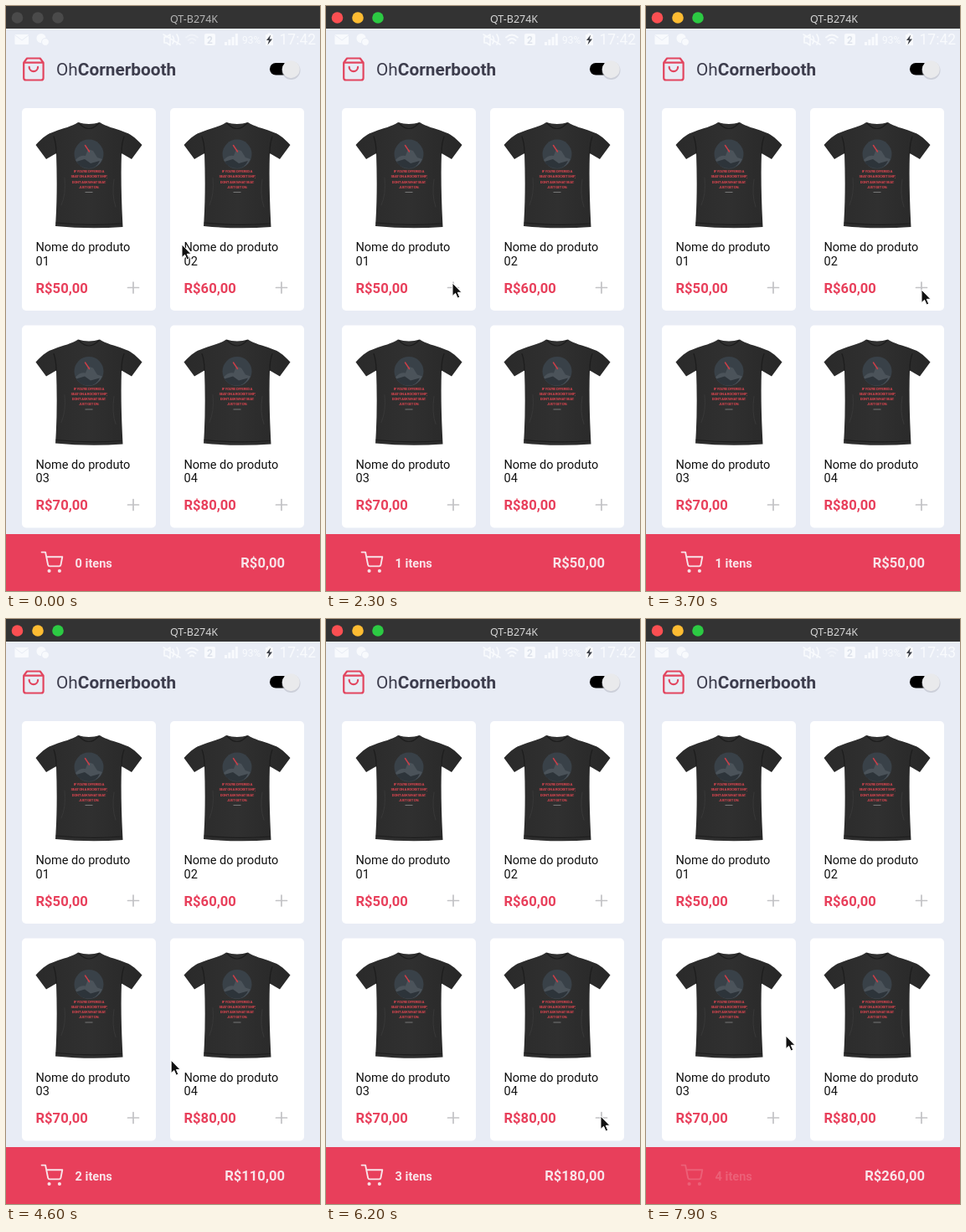
An HTML page for the animation above (8000 ms loop, 375x699 px).

```html
<!DOCTYPE html>
<html lang="pt">
<head>
<meta charset="utf-8">
<style>
html, body { margin: 0; width: 100%; height: 100%; overflow: hidden; background: #e8ecf5; }
svg { display: block; }
text { font-family: Roboto, sans-serif; white-space: pre; }
.line { fill: none; stroke-linecap: round; stroke-linejoin: round; }
.name { font-size: 14.5px; fill: #111; }
.price { font-size: 16.6px; font-weight: 700; fill: #e83f5b; }
.print { font-size: 4.4px; font-weight: 700; letter-spacing: -.35px; fill: #d4454f; text-anchor: middle; }
</style>
</head>
<body>
<svg width="375" height="699" viewBox="0 0 375 699">
  <defs>
    <linearGradient id="cloth">
      <stop offset="0" stop-color="#2a2a2a"/>
      <stop offset=".5" stop-color="#303030"/>
      <stop offset="1" stop-color="#272727"/>
    </linearGradient>
    <g id="shirt">
      <path fill="url(#cloth)" d="M86 139C79 144 68 146 58 150C49 153 45 156 35.500 166L48 183L60 176C61 205 61 235 59 263Q99 267 139.500 264C138 235 137 205 138 176L150 183L162.500 166C153 156 149 153 140 150C130 146 119 144 112 139Q99 143 86 139Z"/>
      <path class="line" stroke="#1d1d1d" stroke-width="1.200" d="M87 140Q99 153 111 140M60 176Q60 164 57 156M138 176Q138 164 141 156M60 259Q99 263 138 260"/>
      <path class="line" stroke="#383838" d="M66 238Q72 225 70 205M131 240Q126 226 129 207"/>
      <circle cx="99" cy="177" r="17.500" fill="#394148"/>
      <path fill="#4b535a" d="M83 184Q88 178 95 179L98 171L104 173L109 181L115 183Q110 194 99 194Q88 194 83 184Z"/>
      <path fill="#2d343a" d="M84 186L94 183L101 188L112 185Q108 194 99 194Q89 194 84 186Z"/>
      <path class="line" stroke="#c93f48" stroke-width="1.500" d="M94.500 166.500L99.500 174"/>
      <text class="print" x="99" y="199">IF YOU'RE OFFERED A</text>
      <text class="print" x="99" y="205.300">SEAT ON A ROCKET SHIP,</text>
      <text class="print" x="99" y="211.600">DON'T ASK WHAT SEAT.</text>
      <text class="print" x="99" y="217.900">JUST GET ON.</text>
      <path stroke="#777" d="M94.500 222.500h9"/>
    </g>
  </defs>

  <rect width="375" height="699" fill="#e8ecf5"/>
  <rect width="375" height="27" fill="#333"/>
  <g id="lights"><circle cx="13.500" cy="14" r="6.800"/><circle cx="38" cy="14" r="6.800"/><circle cx="62" cy="14" r="6.800"/></g>
  <text id="device" x="224.500" y="19.500" text-anchor="middle" style="font:12.500px 'Noto Sans',sans-serif">QT-B274K</text>

  <g fill="#f8fafd">
    <rect x="10.500" y="34" width="16.500" height="12" rx="1"/>
    <path class="line" stroke="#e8ecf5" d="M11 35l8 6l8-6"/>
    <circle cx="42" cy="38.500" r="5.500"/><circle cx="47" cy="43" r="4.500" stroke="#e8ecf5"/>
    <path class="line" stroke="#f8fafd" stroke-width="1.600" d="M189 37v7h3l4 3V34l-4 3zM199 36q3 4 0 9M204 34q4 6 0 12M188 34l20 12"/>
    <path id="wifi" class="line" stroke="#f8fafd" stroke-width="1.900" d="M215 37.500q7-6 14 0M217.500 41q4.500-4 9 0M220 44.500q2-2 4 0"/>
    <rect x="237" y="33" width="13" height="14" rx="2"/>
    <text x="243.500" y="44.500" font-size="12" font-weight="700" text-anchor="middle" style="fill:#dce1eb">2</text>
    <path d="M261 47v-4h3v4zM265.300 47v-7h3v7zM269.600 47v-10h3v10zM273.900 47v-14h3v14z"/>
    <text x="282" y="45" font-size="12">93%</text>
    <path d="M312.500 32.500h4v1.500h2.500v13h-9V34h2.500z"/>
    <path fill="#3c3f46" d="M316 34.500l-5 6.500h3l-1.500 5.500l5.500-7h-3.200z"/>
    <text id="clock" x="326.500" y="46.300" font-size="17.500"></text>
  </g>

  <g class="line" stroke="#e2455f" stroke-width="1.700" transform="translate(17.300 59.900) scale(1.300)">
    <path d="M6 2L3 6v14a2 2 0 0 0 2 2h14a2 2 0 0 0 2-2V6l-3-4zM3 6h18M16 10a4 4 0 0 1-8 0"/>
  </g>
  <text x="60" y="83" font-size="20.800" fill="#3d3d4d">Oh<tspan font-weight="700">Cornerbooth</tspan></text>
  <rect x="315" y="68" width="33" height="14.500" rx="7.250"/>
  <circle cx="340.500" cy="77" r="11" fill="#b9bdc6" opacity=".6"/>
  <circle cx="340.300" cy="75.700" r="10.500" fill="#e9eaec"/>

  <g id="cards"></g>

  <rect y="631" width="375" height="68" fill="#e83f5b"/>
  <g id="cart">
    <g class="line" stroke="#f8e4e9" stroke-width="1.700" transform="translate(41.500 651.500) scale(1.120)">
      <path d="M1 1h4l2.680 13.390a2 2 0 0 0 2 1.610h9.720a2 2 0 0 0 2-1.610L23 6H6"/>
      <circle cx="9" cy="21" r="1"/><circle cx="20" cy="21" r="1"/>
    </g>
    <text id="count" x="82.500" y="670.700" font-size="14.600" font-weight="700" fill="#f8e4e9"></text>
  </g>
  <text id="total" x="333" y="671.300" font-size="16.600" font-weight="700" fill="#f8e4e9" text-anchor="end"></text>

  <path id="cursor" d="M0 0V15.500L3.600 12.300L6.100 18L8.700 16.800L6.300 11.300H11Z" fill="#111" stroke="#fff"/>
</svg>
<script>
const $ = id => document.getElementById(id);
const LOOP = 8000, FOCUS = 1700;
const prices = [50, 60, 70, 80];
const presses = [1900, 3900, 5300, 6300];   // moment each plus button dims
const updates = [2100, 4100, 5600, 6500];   // moment each item reaches the cart
const cartPress = 7700;

// time, x, y of the pointer tip
const path = [
  [0, 210, 285], [300, 210, 285], [1100, 151, 331], [2700, 151, 331],
  [3200, 351, 337], [3500, 329, 339], [4200, 329, 339], [4800, 151, 593],
  [5100, 151, 593], [5400, 302, 606], [5700, 328, 594], [6600, 328, 594],
  [7100, 84, 672], [7400, 84, 672], [7900, 167, 498], [LOOP, 167, 498]
];

$('cards').innerHTML = prices.map((price, i) => `
  <g transform="translate(${i % 2 * 177} ${(i >> 1) * 259.5})">
    <rect x="19" y="122" width="160" height="242" rx="5" fill="#fff"/>
    <use href="#shirt"/>
    <text class="name" x="35.500" y="293">Nome do produto</text>
    <text class="name" x="35.500" y="309.700">0${i + 1}</text>
    <text class="price" x="35.500" y="342.500">R$${price},00</text>
    <path id="plus${i}" class="line" stroke="#c2c2c5" stroke-width="1.700" d="M145.500 336.500h13M152 330v13"/>
  </g>`).join('');

const clamp = v => Math.max(0, Math.min(1, v));
const ease = v => v * v * (3 - 2 * v);

function pointer(t) {
  const i = path.findIndex(p => p[0] > t);
  const [t0, x0, y0] = path[i - 1], [t1, x1, y1] = path[i];
  const k = ease((t - t0) / (t1 - t0));
  return [x0 + (x1 - x0) * k, y0 + (y1 - y0) * k];
}

// Drops to 20 % on touch, then recovers.
function touch(t, start) {
  const d = t - start;
  return d < 0 ? 1 : d < 200 ? 1 - .8 * clamp((d + 50) / 150) : .2 + .8 * clamp((d - 150) / 250);
}

function draw(t) {
  const active = t >= FOCUS;
  const colors = active ? ['#fb4f52', '#fdbc32', '#2cca43'] : ['#4a4a4a', '#4a4a4a', '#4a4a4a'];
  [...$('lights').children].forEach((c, i) => c.setAttribute('fill', colors[i]));
  $('device').setAttribute('fill', active ? '#d5d5d5' : '#b5b5b5');
  $('wifi').setAttribute('opacity', active && t < 7200 ? 1 : .5);
  $('clock').textContent = t < 7200 ? '17:42' : '17:43';

  const items = updates.filter(u => t >= u).length;
  $('count').textContent = items + ' itens';
  $('total').textContent = `R$${prices.slice(0, items).reduce((a, b) => a + b, 0)},00`;
  presses.forEach((p, i) => $('plus' + i).setAttribute('opacity', touch(t, p)));
  $('cart').setAttribute('opacity', t < cartPress ? 1 : .2);
  $('cursor').setAttribute('transform', `translate(${pointer(t)})`);
}

function frame(now) {
  draw(Math.floor(now % LOOP / 100) * 100);
  requestAnimationFrame(frame);
}
draw(0);
requestAnimationFrame(frame);
</script>
</body>
</html>
```
